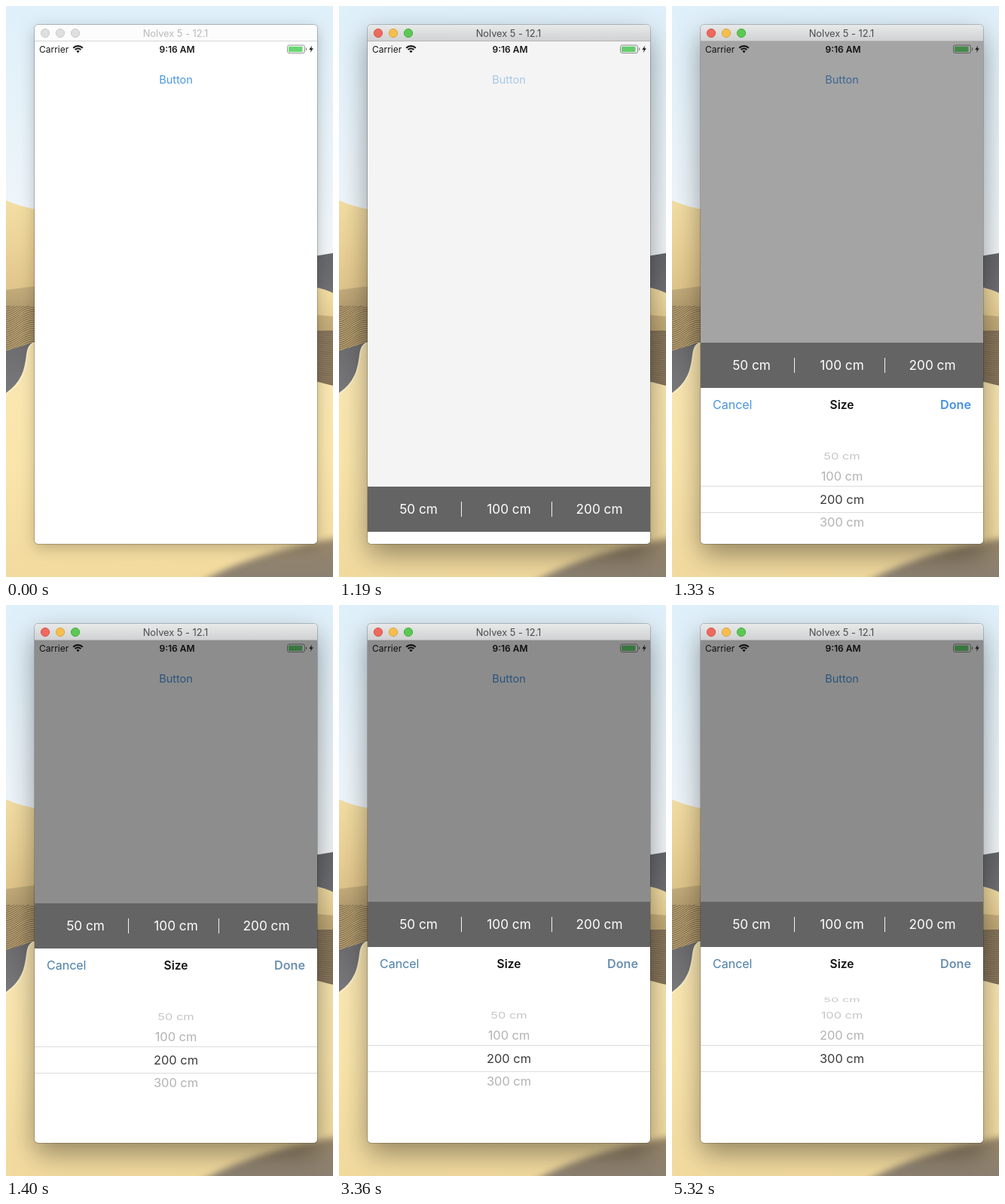
Write an HTML page with a canvas that moves like this. It is 434 by 758 pixels and loops after 5390 ms.

```html
<!DOCTYPE html>
<html lang="en">
<head>
<meta charset="utf-8">
<title>Size picker</title>
<style>
  html, body { margin: 0; width: 100%; height: 100%; overflow: hidden; }
  canvas { display: block; }
</style>
</head>
<body>
<canvas id="stage" width="434" height="758"></canvas>
<script>
const ctx = document.getElementById('stage').getContext('2d');
const LOOP = 5390, STEP = 70;
const WIN = { x: 38, y: 25, w: 375, h: 689 };
const MID = 225.5;
const SIZES = ['50 cm', '100 cm', '200 cm', '300 cm'];

const clamp = v => Math.max(0, Math.min(1, v));
const ease = (t, from, to) => {
  const p = clamp((t - from) / (to - from));
  return p * p * (3 - 2 * p);
};

function rect(x, y, w, h, fill) {
  ctx.fillStyle = fill;
  ctx.fillRect(x, y, w, h);
}

function roundRect(x, y, w, h, r) {
  ctx.beginPath();
  ctx.roundRect(x, y, w, h, r);
}

function circle(x, y, r, fill, stroke) {
  ctx.beginPath();
  ctx.arc(x, y, r, 0, 7);
  ctx.fillStyle = fill;
  ctx.fill();
  if (!stroke) return;
  ctx.strokeStyle = stroke;
  ctx.lineWidth = 1;
  ctx.stroke();
}

function shape(path, fill) {
  ctx.fillStyle = fill;
  ctx.fill(new Path2D(path));
}

function fade(y0, y1, ...colors) {
  const g = ctx.createLinearGradient(0, y0, 0, y1);
  colors.forEach((c, i) => g.addColorStop(i / (colors.length - 1), c));
  return g;
}

// y is the middle of the capital letters
function text(str, x, y, size, color, align = 'center', weight = 400) {
  ctx.font = `${weight} ${size}px Inter, sans-serif`;
  ctx.textAlign = align;
  ctx.fillStyle = color;
  ctx.fillText(str, x, y + size * 0.36);
}

function ripples(path, x, y0, y1, base, line, slope) {
  ctx.save();
  ctx.clip(new Path2D(path));
  rect(x, y0, 40, y1 - y0, base);
  ctx.strokeStyle = line;
  ctx.lineWidth = 1.2;
  for (let y = y0 - 30; y < y1 + 30; y += 2.8) {
    ctx.beginPath();
    ctx.moveTo(x, y + slope);
    ctx.bezierCurveTo(x + 12, y + slope, x + 22, y - 2, x + 40, y);
    ctx.stroke();
  }
  ctx.restore();
}

function drawDesert() {
  rect(0, 0, 434, 758, fade(0, 330, '#dff0fa', '#e8f3fa', '#f3f7fa'));

  shape('M0 258Q18 266 40 270V380H0Z', fade(258, 376, '#f3dea4', '#ecd398', '#e0c58a'));
  shape('M0 377Q20 374 40 372V402H0Z', fade(372, 400, '#c4ad7c', '#b59d6f'));
  ripples('M0 398H40V450L0 459Z', 0, 398, 460, '#85714f', '#c2aa7a', 16);
  shape('M0 458Q20 452 40 445V520H0Z', fade(448, 515, '#6c6c6f', '#79797c'));

  shape('M410 332L434 328V385H410Z', fade(328, 381, '#66676b', '#717175'));
  shape('M410 373Q424 376 434 381V415H410Z', fade(374, 412, '#f5e0a6', '#e8cf94'));
  shape('M410 410L434 412V434H410Z', fade(410, 432, '#c9b07c', '#c0a876'));
  ripples('M410 431H434V506H410Z', 404, 431, 506, '#7b6b54', '#948163', -3);

  const ridge = 'M0 515C22 500 26 482 28 463Q30 447 40 447';
  shape(ridge + 'L410 498L434 504V758H0Z', fade(447, 758, '#fae7b3', '#fae5ab', '#f2da9e'));
  ctx.strokeStyle = '#fdefc6';
  ctx.lineWidth = 2;
  ctx.stroke(new Path2D(ridge));

  ctx.save();
  ctx.filter = 'blur(4px)';
  shape('M250 770C300 738 370 718 450 704V770Z', fade(705, 758, '#9a8869', '#8b8071'));
  ctx.restore();
}

function drawFrame(active) {
  ctx.save();
  ctx.shadowColor = active ? 'rgba(0,0,0,.4)' : 'rgba(0,0,0,.24)';
  ctx.shadowBlur = active ? 36 : 20;
  ctx.shadowOffsetY = active ? 14 : 5;
  roundRect(WIN.x, WIN.y, WIN.w, WIN.h, 5);
  ctx.fillStyle = '#fff';
  ctx.fill();
  ctx.restore();
  ctx.strokeStyle = 'rgba(0,0,0,.2)';
  ctx.lineWidth = 1;
  roundRect(WIN.x - 0.5, WIN.y - 0.5, WIN.w + 1, WIN.h + 1, 5);
  ctx.stroke();
}

function drawTitleBar(active) {
  rect(38, 25, 375, 21, active ? fade(25, 46, '#e8e9e9', '#d0d2d3') : '#fcfcfc');
  rect(38, 46, 375, 1, active ? '#b2b4b5' : '#d5d5d5');
  const lights = active
    ? [['#ee6a5f', '#d5544a'], ['#f5be4f', '#dba53c'], ['#5bc854', '#48ad42']]
    : Array(3).fill(['#dfdfdf', '#cacaca']);
  lights.forEach(([fill, edge], i) => circle(52 + i * 20, 36, 5.6, fill, edge));
  text('Nolvex 5 - 12.1', 225, 36.5, 12.8, active ? '#494b4c' : '#b9b9b9');
}

function drawStatusBar() {
  const ink = '#1a1a1a';
  text('Carrier', 44, 57.5, 12, ink, 'left');
  text('9:16 AM', 227, 57.5, 12, ink, 'center', 600);

  ctx.strokeStyle = ink;
  ctx.lineWidth = 2.1;
  for (const r of [8.9, 5.5]) {
    ctx.beginPath();
    ctx.arc(95.5, 62, r, -Math.PI * 0.75, -Math.PI * 0.25);
    ctx.stroke();
  }
  shape('M95.5 62.2L93.4 59.9Q95.5 58.2 97.6 59.9Z', ink);

  ctx.strokeStyle = '#8f8f8f';
  ctx.lineWidth = 1;
  roundRect(373.5, 52, 23, 10.5, 2.5);
  ctx.stroke();
  roundRect(375, 53.7, 18.5, 7.2, 1);
  ctx.fillStyle = '#6ad673';
  ctx.fill();
  rect(398, 55.5, 1.2, 3.5, '#8f8f8f');
}

function drawBolt() {
  shape('M406.2 52.5L402.3 58H404.8L403.8 62L407.8 56.3H405.3Z', '#1a1a1a');
}

function drawWheel(center, position) {
  const radius = 87.6, angle = 0.361;
  SIZES.forEach((label, i) => {
    const a = (i - position) * angle;
    const y = radius * Math.sin(a);
    const paint = color => {
      ctx.save();
      ctx.translate(MID, center + y);
      ctx.scale(1, Math.cos(a));
      text(label, 0, 0, 16.4, color);
      ctx.restore();
    };
    const bandPath = new Path2D();
    bandPath.rect(38, center - 17, 375, 34);
    const outside = new Path2D(bandPath);
    outside.rect(38, center - 148, 375, 260);

    // Labels are dark inside the selection band and grey outside it
    ctx.save();
    ctx.clip(outside, 'evenodd');
    ctx.globalAlpha = 1 - 0.25 * clamp(Math.abs(a) / angle - 1);
    paint('#b2b2b2');
    ctx.restore();
    ctx.save();
    ctx.clip(bandPath);
    paint('#3c3c3c');
    ctx.restore();
  });
  rect(38, center - 18, 375, 1, '#dcdcdc');
  rect(38, center + 17, 375, 1, '#dcdcdc');
}

function drawSheet(top, position, muted) {
  rect(38, top, 375, 60, '#646464');
  rect(38, top + 60, 375, 260, '#fff');
  SIZES.slice(0, 3).forEach((label, i) => text(label, 105.5 + i * 120, top + 30, 17.2, '#fff'));
  for (const x of [162, 282]) rect(x, top + 20, 1, 20, '#f4f4f4');

  text('Cancel', 54, top + 82, 16, muted ? '#4c7fa9' : '#4a94dd', 'left');
  text('Size', MID, top + 82, 15.5, '#111', 'center', 600);
  text('Done', 397, top + 82, 16.2, muted ? '#6c8faf' : '#4591de', 'right', 600);
  drawWheel(top + 208, position);
}

function draw(t) {
  const active = t >= 770;
  const pressed = t >= 840 ? 0.16 + 0.84 * ease(t, 1050, 1400) : 1;
  const open = ease(t, 1086, 1415);
  const dim = 0.45 * ease(t, 1139, 1410);
  const position = 2 + ease(t, 4200, 4760);

  drawDesert();
  drawFrame(active);

  ctx.save();
  roundRect(WIN.x, WIN.y, WIN.w, WIN.h, 5);
  ctx.clip();
  drawStatusBar();
  ctx.globalAlpha = pressed;
  text('Button', MID, 97.5, 14.5, '#4a97e0');
  ctx.globalAlpha = 1;
  rect(38, 47, 375, 667, `rgba(0,0,0,${dim})`);
  drawBolt();
  if (open > 0) drawSheet(Math.round(714 - 320 * open), position, t >= 1400);
  drawTitleBar(active);
  ctx.restore();
}

function tick() {
  const t = performance.now() % LOOP;
  draw(Math.floor(t / STEP) * STEP);
  requestAnimationFrame(tick);
}
tick();
</script>
</body>
</html>
```
